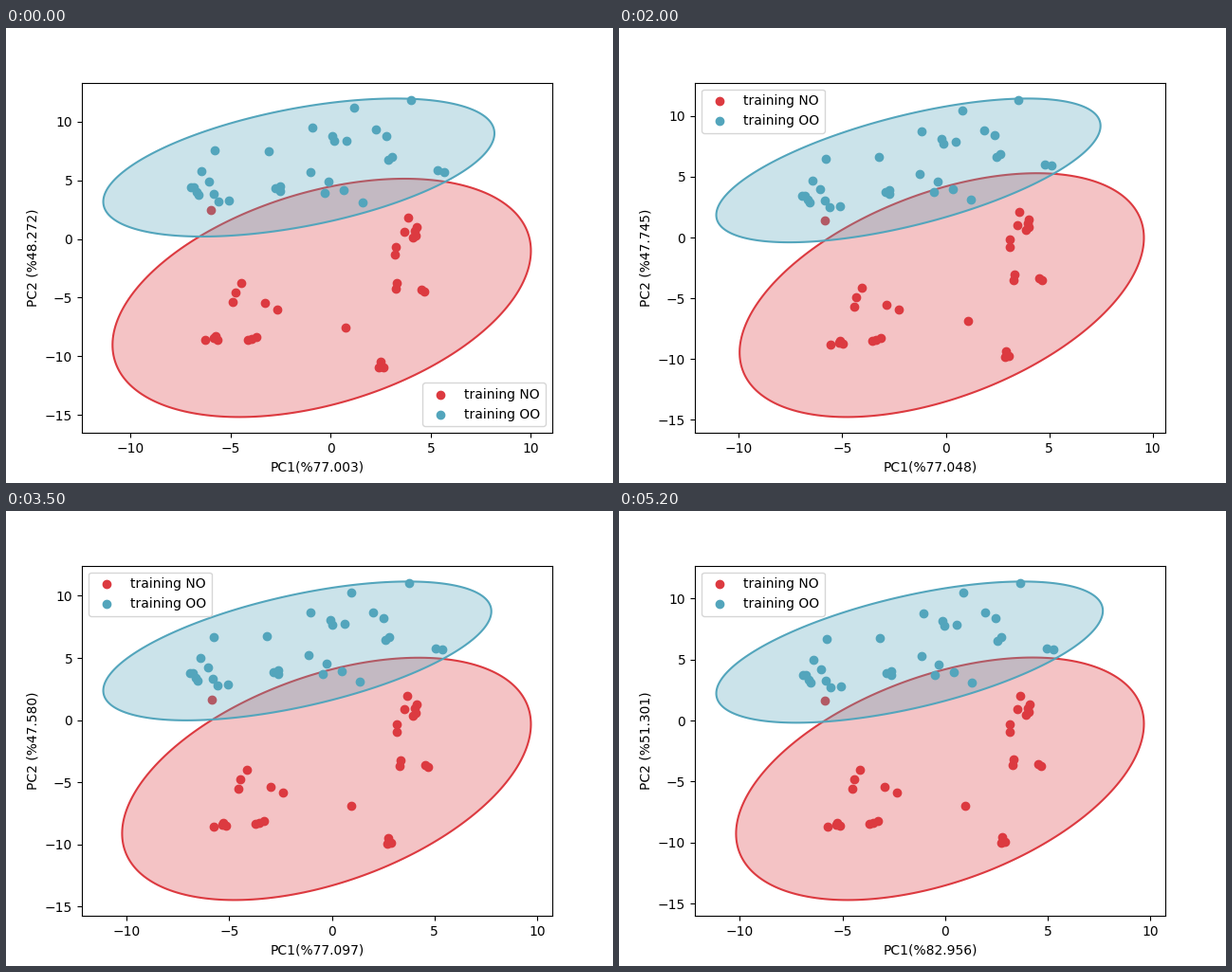
A matplotlib script for the animation above (5300 ms loop, 640x480 px).

```python
import numpy as np
import matplotlib.pyplot as plt
from matplotlib.animation import FuncAnimation
from matplotlib.transforms import Affine2D

W, H, DPI = 640, 480, 100
FRAMES, STEP = 53, 100
LEGEND_SWITCH = 16
RED, TEAL = "#dc3a40", "#53a5bc"

# Outer ellipse edges, fixed by the 5 % axes margin
LEFT, RIGHT, TOP, BOTTOM = 102.55, 553.45, 74.4, 410.4

# Key moments: frame, tilt, shrink, left x limit, explained variances
KEYS = np.array([
    (0, 0, 0, -12.42, 77.003, 48.272),
    (8, .010, -.09, -12.32, 76.921, 48.411),
    (13, .010, -.10, -12.25, 76.892, 48.467),
    (20, .125, .45, -12.13, 77.048, 47.745),
    (29, .085, .76, -12.23, 77.167, 47.489),
    (42, .065, .80, -12.11, 77.015, 47.686),
    (52, .090, .51, -12.18, 82.956, 51.301),
])
BASE_TILT, BASE_SHRINK = KEYS[4, 1:3]

# Scattered samples in stage pixels at the base tilt and shrink
RED_DOTS = [
    (217, 200), (423, 195), (420, 209), (433, 204), (431, 208), (429, 215),
    (432, 212), (412, 225), (412, 233), (416, 262), (415, 268), (442, 267),
    (445, 269), (254, 273), (248, 283), (246, 293), (280, 291), (293, 297),
    (365, 311), (220, 333), (230, 329), (229, 331), (233, 332), (264, 330),
    (268, 329), (273, 327), (404, 344), (403, 350), (407, 349)]
TEAL_DOTS = [
    (424, 76), (364, 86), (321, 107), (387, 107), (342, 115), (344, 120),
    (357, 119), (398, 113), (219, 134), (275, 133), (404, 133), (400, 136),
    (452, 145), (459, 146), (319, 152), (338, 161), (334, 172), (354, 169),
    (373, 180), (282, 170), (287, 168), (287, 172), (205, 156), (213, 166),
    (194, 172), (197, 172), (200, 177), (202, 180), (218, 178), (223, 185),
    (234, 184)]


def red_frame(tilt, shrink):
    left = 112.3 + 111 * tilt + 2.2 * shrink
    top = 159 - 41.4 * tilt - 1.4 * shrink
    rho = .395 + .53 * tilt + .02 * shrink
    turn = .4 * (tilt - BASE_TILT)
    return ellipse_frame(left, RIGHT, top, BOTTOM, rho, turn)


def teal_frame(tilt, shrink):
    right = 515 - 66.7 * tilt + 2.3 * shrink
    bottom = 220 + 69 * tilt - 5.6 * shrink
    return ellipse_frame(LEFT, right, TOP, bottom, .495 + tilt)


def ellipse_frame(x0, x1, y0, y1, rho, turn=0):
    """Centre and matrix that map the unit circle to the ellipse."""
    hx, hy = (x1 - x0) / 2, (y1 - y0) / 2
    shear = np.array([[hx, 0], [-hy * rho, -hy * np.sqrt(1 - rho ** 2)]])
    c, s = np.cos(turn), np.sin(turn)
    return np.array([(x0 + x1) / 2, (y0 + y1) / 2]), shear @ [[c, -s], [s, c]]


def place(unit, frame):
    centre, matrix = frame
    return centre + unit @ matrix.T


def whiten(points, frame):
    centre, matrix = frame
    return (np.array(points) - centre) @ np.linalg.inv(matrix).T


angle = np.linspace(0, 2 * np.pi, 240, endpoint=False)
CIRCLE = np.column_stack([np.cos(angle), np.sin(angle)])

fig, ax = plt.subplots(figsize=(W / DPI, H / DPI), dpi=DPI)
stage = Affine2D().scale(1, -1).translate(0, H)


class Group:
    def __init__(self, label, color, frame_of, points):
        self.frame_of = frame_of
        self.unit = whiten(points, frame_of(BASE_TILT, BASE_SHRINK))
        self.dots = ax.scatter([], [], color=color, label=label, transform=stage)
        self.area, = ax.fill(*CIRCLE.T, fc=(color, 0.3), ec=color, lw=1.5,
                             transform=stage)

    def update(self, tilt, shrink):
        frame = self.frame_of(tilt, shrink)
        self.dots.set_offsets(place(self.unit, frame))
        self.area.set_xy(place(CIRCLE, frame))


groups = [
    Group("training NO", RED, red_frame, RED_DOTS),
    Group("training OO", TEAL, teal_frame, TEAL_DOTS),
]
legend = ax.legend(loc="lower right")
ax.set_xticks(range(-10, 11, 5))
ax.set_yticks(range(-15, 11, 5))


def state(n):
    i = min(np.searchsorted(KEYS[:, 0], n, side="right") - 1, len(KEYS) - 2)
    start, end = KEYS[i], KEYS[i + 1]
    p = (n - start[0]) / (end[0] - start[0])
    if i == len(KEYS) - 2:
        p = p ** 3  # the closing fit departs late
    return ((1 - p) * start + p * end)[1:]


def draw(n):
    tilt, shrink, x_min, pc1, pc2 = state(n)
    x_max = 11.07 - .8 * (x_min + 12.42) - 1.8 * tilt
    ax.set_xlim(x_min, x_max)
    ax.set_ylim(-16.53 + shrink, 13.32 - .65 * tilt - 1.085 * shrink)
    ax.set_xlabel(f"PC1(%{pc1:.3f})")
    ax.set_ylabel(f"PC2 (%{pc2:.3f})")
    for group in groups:
        group.update(tilt, shrink)
    legend.set_loc("lower right" if n < LEGEND_SWITCH else "upper left")
    return []


anim = FuncAnimation(fig, draw, frames=FRAMES, interval=STEP, repeat=True,
                     repeat_delay=0, blit=False)
plt.show()
```
